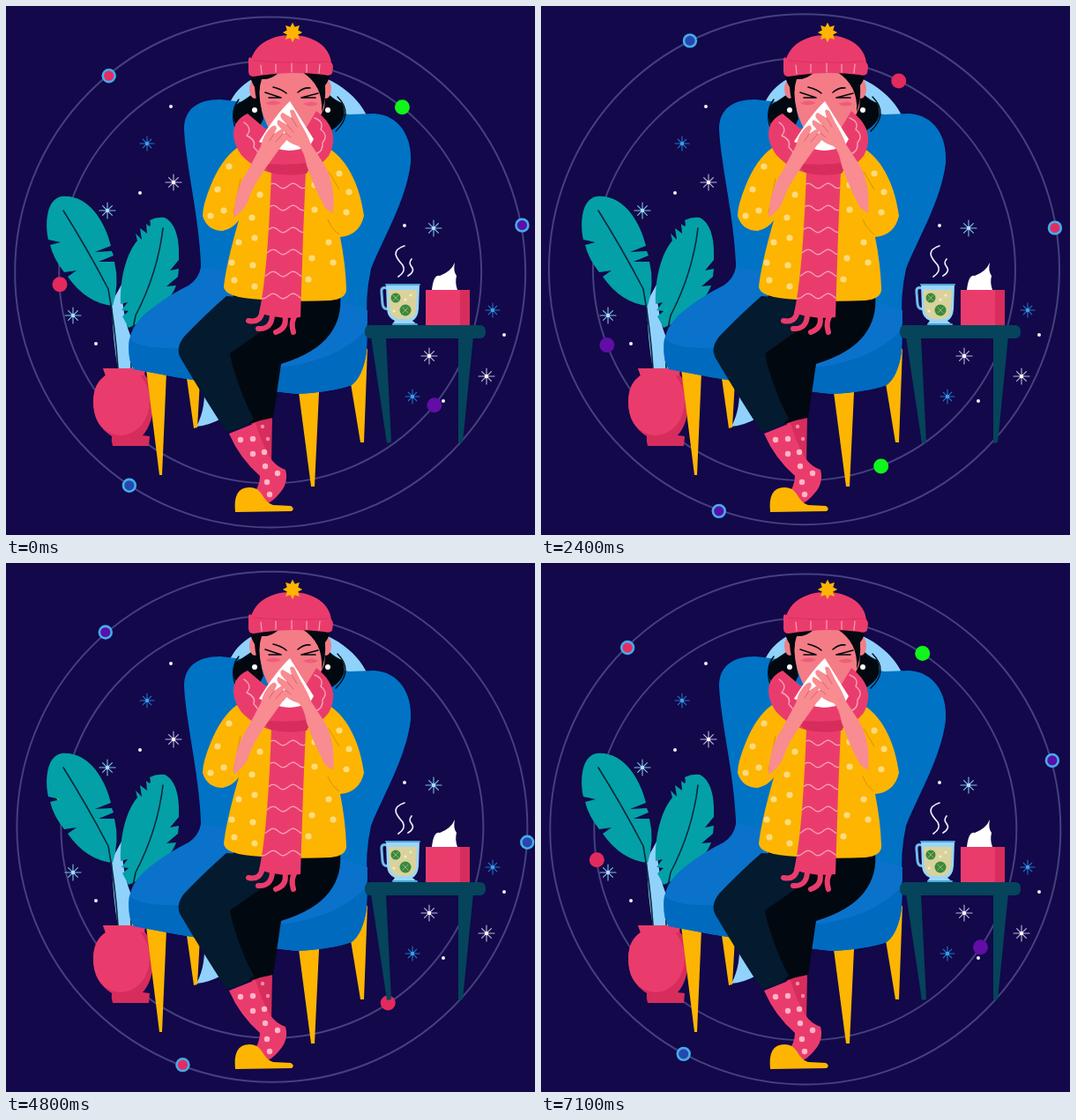
Write an HTML page with a canvas that moves like this. It is 600 px wide and 600 px high and loops after 7200 ms.

```html
<!DOCTYPE html>
<html lang="en">
<head>
<meta charset="utf-8">
<title>Winter cold</title>
<style>
html, body { margin: 0; width: 100%; height: 100%; overflow: hidden; background: #12084a; }
canvas { display: block; width: 600px; height: 600px; }
</style>
</head>
<body>
<canvas id="stage" width="600" height="600"></canvas>
<script>
const SIZE = 600, LOOP = 7200, STEP = 100, TAU = Math.PI * 2, RAD = Math.PI / 180;
const NIGHT = '#12084a', BLUE = '#0073c5', SEAT = '#0a72ca', SHADE = '#006abf', SKY = '#90d2fb',
  GOLD = '#fdb502', PINK = '#ea3c6c', ROSE = '#d62d5c', FACE = '#f47c86', SKIN = '#f88c90',
  INK = '#020810', NAVY = '#041a2e', TEAL = '#03a0a8', PETROL = '#05445a', BLUSH = '#f7a3b7',
  CREAM = '#fedb7c';

const stage = document.getElementById('stage').getContext('2d');
const sceneCanvas = document.createElement('canvas');
sceneCanvas.width = sceneCanvas.height = SIZE;
const scene = sceneCanvas.getContext('2d');

function fill(color, path) {
  scene.fillStyle = color;
  scene.fill(new Path2D(path));
}

function line(color, width, path) {
  scene.strokeStyle = color;
  scene.lineWidth = width;
  scene.lineCap = scene.lineJoin = 'round';
  scene.stroke(new Path2D(path));
}

function disc(ctx, color, x, y, rx, ry = rx) {
  ctx.fillStyle = color;
  ctx.beginPath();
  ctx.ellipse(x, y, rx, ry, 0, 0, TAU);
  ctx.fill();
}

function dots(color, r, points) {
  points.forEach(([x, y]) => disc(scene, color, x, y, r));
}

function clipped(path, draw) {
  scene.save();
  scene.clip(new Path2D(path));
  draw();
  scene.restore();
}

function flake(color, core, x, y, r) {
  for (let i = 0; i < 8; i++) {
    const a = i * TAU / 8, k = i % 2 ? 0.85 : 1;
    line(color, 1.1, `M${x} ${y}L${x + Math.cos(a) * r * k} ${y + Math.sin(a) * r * k}`);
  }
  disc(scene, core, x, y, 2.2);
}

function wave(x0, x1, y) {
  let path = '';
  for (let x = x0; x <= x1; x += 2) {
    path += `${path ? 'L' : 'M'}${x} ${y + 2.8 * Math.sin((x - x0) / 3.6)}`;
  }
  line(BLUSH, 1.3, path);
}

function drawSky() {
  [[115, 232], [76, 351], [485, 252]].forEach(p => flake('#84c1ea', '#a9dcf8', ...p, 9));
  [[190, 200], [480, 397], [545, 420]].forEach(p => flake('#bdb8dc', '#ffffff', ...p, 9));
  [[160, 156], [552, 345], [461, 443]].forEach(p => flake('#2474c4', '#3aa0ea', ...p, 8));
  dots('#f0eefa', 2, [[187, 114], [152, 212], [102, 383], [452, 249], [565, 373], [496, 448]]);
}

function drawPlant() {
  fill(SKY, 'M131 316L120 336Q121 380 127 412L148 412L144 382Q131 350 131 316Z');
  fill(TEAL, 'M63 216C46 219 44 246 48 265L62 268L50 271Q54 287 66 302L80 300L70 307Q91 337 121 340' +
    'Q129 315 123 290L105 290L122 283L120 278L101 279L119 272C113 246 94 213 63 216Z');
  fill(TEAL, 'M180 240C194 247 197 268 196 288L186 300L196 298L195 307L182 318L193 317' +
    'C184 340 163 355 139 365L132 352L139 346L131 345L138 336L130 338C129 308 137 280 149 266' +
    'L147 258L154 265L152 252L160 258L159 247Q166 254 163 243Q171 239 180 240Z');
  line('#06283c', 1.6, 'M65 232Q92 275 116 321Q124 365 127 411');
  line('#06283c', 1.6, 'M178 252Q172 303 147 351Q140 380 142 411');

  const pot = 'M110 411L158 411L157 418Q168 430 167 452Q166 475 155 487L163 488L162 499L121 499' +
    'Q119 493 120 488Q99 475 99 449Q99 428 113 419Z';
  fill(ROSE, pot);
  clipped(pot, () => {
    disc(scene, PINK, 130, 448, 33, 39);
    fill(PINK, 'M108 409H158V419H108Z');
  });
}

function drawChair() {
  fill(SKY, 'M253 112C264 84 298 70 328 73C370 77 404 104 412 132L320 180Z');
  fill(SKY, 'M224 425Q228 454 216 477Q230 476 246 467L250 420Z');
  fill(GOLD, 'M205 422L220 425L217 478L213 479Z');
  fill(GOLD, 'M390 422L410 388L406 495L402 495Z');
  fill(GOLD, 'M159 412L182 415L177 532L174 532Z');
  fill(GOLD, 'M332 438L355 438L350 545L346 545Z');
  fill(BLUE, 'M202 140C202 117 217 106 243 106L390 123L418 122C446 124 461 148 459 178' +
    'C454 220 428 263 414 298Q407 330 410 360L300 400L221 310L221 292C219 240 204 180 202 140Z');
  fill(SEAT, 'M221 296Q219 309 207 317Q186 327 164 344Q140 362 139 386Q139 405 145 412' +
    'Q240 431 330 440Q368 438 392 430Q405 420 409 392L410 345L300 310Z');
  fill(SHADE, 'M140 377Q151 390 204 388L300 411Q375 405 410 366L409 392Q405 420 392 430' +
    'Q368 438 330 440Q240 431 145 412Q138 402 140 377Z');
}

function drawTable() {
  scene.fillStyle = PETROL;
  scene.beginPath();
  scene.roundRect(407, 362, 137, 15, 6);
  scene.fill();
  fill(PETROL, 'M414 375L431 375L437 495L432 496Z');
  fill(PETROL, 'M513 375L530 375L518 495L513 496Z');

  line('#72bce9', 3, 'M432 320Q425 318 426 325L427 338Q428 345 434 343');
  fill('#9bd6f8', 'M431 316L469 316L468 344Q467 354 461 357L466 361L438 361L441 357Q433 354 432 344Z');
  fill('#d9d29c', 'M434 322L466 322L465 345Q463 354 456 355L445 355Q436 353 435 344Z');
  line('#4ba4d9', 2, 'M431 316L469 316M439 361L466 361');
  [[442, 331, 5.5], [453, 345, 6.5]].forEach(([x, y, r]) => {
    disc(scene, '#398942', x, y, r);
    line('#96b65c', 1, `M${x - 3} ${y - 3}L${x + 3} ${y + 3}M${x + 3} ${y - 3}L${x - 3} ${y + 3}`);
  });
  dots('#f4efc5', 1.5, [[459, 328], [440, 346], [453, 333]]);
  line('#eeeefa', 1.7, 'M452 272C434 278 445 288 450 294Q454 301 445 307');
  line('#eeeefa', 1.7, 'M460 287C454 294 464 296 461 301Q460 304 456 306');

  fill(PINK, 'M476 322H526V362H476Z');
  fill(ROSE, 'M515 322H526V362H515Z');
  fill('#ffffff', 'M483 322Q485 304 492 306Q505 301 509 291Q507 301 511 306Q509 314 512 322Z');
}

function drawLegs() {
  fill(ROSE, 'M278 471L302 466L301 520L285 505Z');
  fill(PINK, 'M253 485L283 473Q289 494 300 513Q306 522 317 526Q321 541 310 553Q303 562 293 566L278 558' +
    'Q288 545 288 533Q265 513 253 485Z');
  dots('#ffb6c6', 3.2, [[266, 492], [280, 491], [280, 508], [293, 506], [294, 522], [308, 530],
    [296, 540], [299, 554]]);
  dots('#f58ba5', 2.2, [[291, 477], [297, 491]]);
  fill(GOLD, 'M260 574Q257 546 276 546C292 546 290 562 303 566L323 567Q328 570 324 573Z');
  fill(INK, 'M258 328L379 328C382 360 366 390 312 406L303 467Q290 469 277 474L246 400Z');
  fill(NAVY, 'M250 329L299 332Q305 360 287 371L254 394L257 408Q268 445 281 468Q270 480 250 483' +
    'Q222 440 199 401Q191 389 202 375Q228 348 250 329Z');
}

function drawSweater() {
  fill(GOLD, 'M262 161Q244 174 232 204Q223 226 223 238Q228 255 246 255Q258 252 264 243Q250 292 247 318' +
    'Q247 331 290 333Q330 336 368 334Q387 332 386 320Q385 292 379 262Q401 260 406 238' +
    'C402 207 389 176 367 162Z');
  line('#d99200', 1, 'M266 196L258 235M366 188L378 208M365 242Q369 253 378 259');
  dots(CREAM, 3.6, [[253, 182], [240, 208], [232, 238], [247, 232], [288, 214], [279, 240],
    [282, 263], [264, 268], [256, 291], [280, 294], [259, 311], [282, 318], [350, 203], [350, 231],
    [366, 268], [347, 286], [371, 291], [343, 310], [378, 190], [389, 211], [386, 234]]);
}

function drawHead() {
  fill(INK, 'M278 101Q268 108 261 112Q253 128 266 141L281 150L292 128L287 104Z');
  fill(INK, 'M366 100Q372 106 381 110Q390 127 371 140L352 148L352 112Z');
  line(INK, 1.4, 'M376 103Q395 122 374 142M264 106Q254 119 260 138');
  disc(scene, FACE, 282, 94, 6, 11);
  disc(scene, FACE, 363, 94, 6, 11);
  fill(FACE, 'M285 76L358 76Q363 102 361 115Q355 131 344 139L298 139Q284 111 285 76Z');
  fill(INK, 'M277 77L309 76Q300 84 290 83Q285 96 290 119Q283 110 282 92Q277 84 277 77Z');
  fill(INK, 'M336 75L367 76Q367 84 362 90Q363 108 358 120Q360 90 336 75Z');
  fill('#ef5d7b', 'M294 110Q304 105 312 110Q302 115 294 110ZM337 111Q347 106 354 111Q346 116 337 111Z');
  line(INK, 1.6, 'M303 92Q312 94 318 99M331 98Q338 92 345 93');
  line(INK, 1.6, 'M294 98L312 104L298 104M354 99L335 104L351 104');
  dots('#ffffff', 3, [[282, 118], [365, 118]]);
}

function drawScarf() {
  fill(PINK, 'M274 122C252 132 256 154 267 169Q286 190 318 192Q350 190 366 170C377 150 370 133 352 119' +
    'L340 139L294 139Z');
  const strip = 'M301 187L340 187L337 260L334 353Q311 356 287 348Q297 304 301 187Z';
  line(PINK, 6, 'M291 345Q289 360 275 357M302 349Q302 367 286 366M316 350Q320 365 306 370' +
    'M330 348Q322 357 326 370');
  fill(PINK, strip);
  clipped(strip, () => {
    for (let y = 204; y < 345; y += 25) wave(286, 342, y);
  });
  fill(ROSE, 'M288 178Q318 182 348 177L341 190Q318 194 300 189Z');
  line(BLUSH, 1.4, 'M270 132Q280 139 273 147Q284 152 281 160Q290 168 285 179');
  line(BLUSH, 1.4, 'M350 127Q361 131 357 140Q366 147 359 155Q360 165 351 168');
}

function drawHands() {
  fill('#ffffff', 'M322 108Q306 123 287 154L306 161Q323 168 345 158L349 151Q335 129 322 108Z');
  fill(SKIN, 'M258 240Q259 209 274 187L289 159Q292 145 301 137Q306 133 307 139L304 145L313 139' +
    'Q317 140 314 145L319 146Q321 151 313 158L298 179Q279 205 274 223Q267 235 258 240Z');
  fill(SKIN, 'M371 235Q374 202 361 180L346 157Q342 146 334 133L327 119Q324 116 322 119L324 127' +
    'L314 121Q310 122 312 127L319 135L309 129Q306 132 309 136L317 144Q313 144 314 148' +
    'Q321 156 332 159Q338 164 341 181Q350 207 362 229Z');
  line('#d95c71', 0.9, 'M304 145L299 153M314 145L306 154M324 127L330 137M319 135L326 143M317 144L323 149');
}

function drawHat() {
  fill(PINK, 'M277 66C279 46 298 33 323 33C349 33 368 46 369 66Z');
  fill(PINK, 'M275 60Q276 56 281 61Q323 65 365 62Q371 64 371 69L370 76Q368 80 361 78Q322 73 281 80' +
    'Q275 80 275 74Z');
  line(ROSE, 0.8, 'M281 62Q323 66 365 63');
  line('#f8a1b8', 1.2, 'M289 67L290 77M306 66L306 75M324 65L324 75M341 66L341 75M356 66L355 76');
  scene.fillStyle = GOLD;
  scene.beginPath();
  for (let i = 0; i < 16; i++) {
    const a = i * TAU / 16 - TAU / 4, r = i % 2 ? 6.8 : 11.2;
    scene.lineTo(325 + Math.cos(a) * r, 30 + Math.sin(a) * r);
  }
  scene.fill();
}

[drawSky, drawPlant, drawChair, drawTable, drawLegs, drawSweater, drawHead, drawScarf, drawHands, drawHat]
  .forEach(draw => draw());

const RINGS = [289.5, 239.5];
const ORBS = [
  { angle: -129.7, r: 287, color: '#e52c62', rim: true },
  { angle: -10.2, r: 290, color: '#5a10aa', rim: true },
  { angle: 123.3, r: 291.7, color: '#2548ae', rim: true },
  { angle: -51.1, r: 238, color: '#10f51b' },
  { angle: 176.2, r: 239.5, color: '#e32a5d' },
  { angle: 39.4, r: 240.5, color: '#610da6' }
];

function render(time) {
  const turn = Math.floor(time % LOOP / STEP) * STEP / LOOP * 360;
  stage.fillStyle = NIGHT;
  stage.fillRect(0, 0, SIZE, SIZE);

  // The rings sit slightly off the pivot, so they wobble as they turn.
  const wobble = (turn + 100) * RAD;
  stage.strokeStyle = '#454080';
  stage.lineWidth = 2;
  for (const r of RINGS) {
    stage.beginPath();
    stage.arc(300 + 2 * Math.cos(wobble), 300 + 2 * Math.sin(wobble), r, 0, TAU);
    stage.stroke();
  }
  for (const { angle, r, color, rim } of ORBS) {
    const a = (angle + turn) * RAD;
    const x = 300 + r * Math.cos(a), y = 300 + r * Math.sin(a);
    if (rim) disc(stage, '#45aceb', x, y, 8.2);
    disc(stage, color, x, y, rim ? 5.6 : 8.5);
  }
  stage.drawImage(sceneCanvas, 0, 0);
}

const start = performance.now();
function tick() {
  render(performance.now() - start);
  requestAnimationFrame(tick);
}
tick();
</script>
</body>
</html>
```
